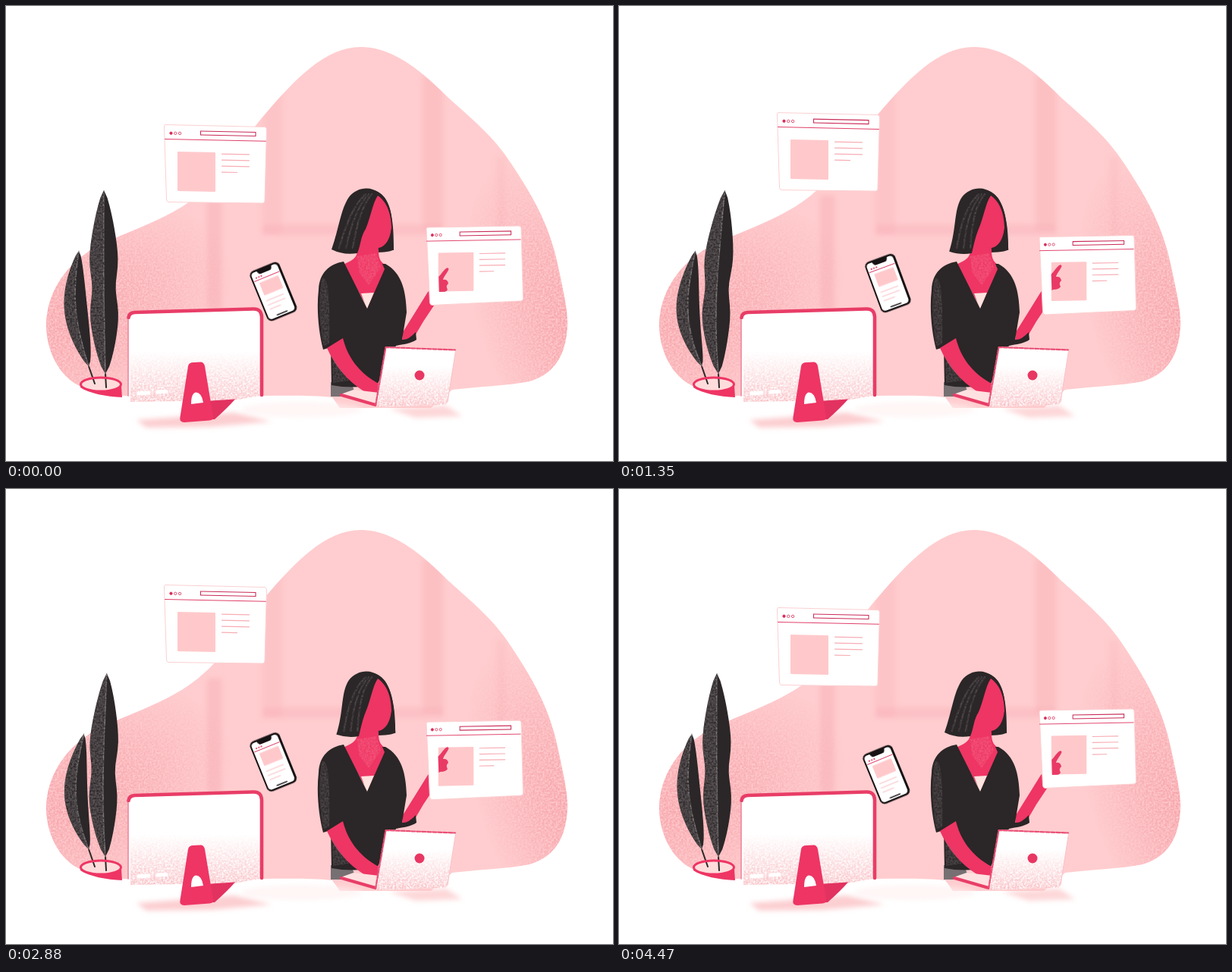
Animation, 800 px wide and 600 px high, one loop 4500 ms. Source, as an HTML page:

```html
<!DOCTYPE html>
<html lang="en">
<head>
<meta charset="utf-8">
<title>Working across screens</title>
<style>
  html, body { margin: 0; width: 100%; height: 100%; overflow: hidden; background: #fff; }
  svg { display: block; width: 100vw; height: 100vh; }
  .line { fill: none; stroke-linecap: round; stroke-linejoin: round; }
</style>
</head>
<body>
<svg viewBox="0 0 800 600">
  <defs>
    <filter id="grain" x="-5%" y="-5%" width="110%" height="110%" color-interpolation-filters="sRGB">
      <feTurbulence type="fractalNoise" baseFrequency=".4" numOctaves="3" seed="4"/>
      <feColorMatrix values="0 0 0 0 0  0 0 0 0 0  0 0 0 0 0  2 0 0 0 -.4" result="n"/>
      <feComposite in="SourceGraphic" in2="n" operator="in"/>
    </filter>
    <filter id="soft" x="-30%" y="-30%" width="160%" height="160%"><feGaussianBlur stdDeviation="3"/></filter>
    <radialGradient id="shade">
      <stop offset="0" stop-color="#f2939b" stop-opacity=".75"/>
      <stop offset=".5" stop-color="#f2939b" stop-opacity=".45"/>
      <stop offset="1" stop-color="#f2939b" stop-opacity="0"/>
    </radialGradient>
    <linearGradient id="fade" x1="0" y1="0" x2="0" y2="1">
      <stop offset="0" stop-color="#f7a3aa" stop-opacity="0"/>
      <stop offset="1" stop-color="#f7a3aa" stop-opacity=".7"/>
    </linearGradient>
    <clipPath id="blobClip"><use href="#blob"/></clipPath>
    <clipPath id="picClip"><path id="picHole" d="M569 325 616 324 617.500 376 571 377Z"/></clipPath>
  </defs>

  <path id="blob" fill="#ffcdcf" d="M468 54C510 54 548 86 583 121C613 148 643 172 666 208C695 252 717 290 728 345C735 378 740 400 740 418C739 455 727 484 690 495C660 501 620 502 588 506L560 530H440L430 516C400 513 370 514 340 514H152C130 512 112 506 97 501C70 488 53 455 53 420C54 376 80 340 118 318C160 297 212 282 250 252C292 220 310 178 342 142C380 98 420 54 468 54Z"/>

  <g clip-path="url(#blobClip)">
    <g filter="url(#soft)" fill="#f6a9b0">
      <rect x="265" y="250" width="19" height="150" opacity=".42"/>
      <rect x="338" y="105" width="26" height="196" opacity=".26"/>
      <rect x="338" y="288" width="238" height="14" opacity=".32"/>
      <rect x="549" y="92" width="27" height="204" opacity=".36"/>
      <rect x="646" y="200" width="13" height="110" opacity=".2"/>
    </g>
    <g filter="url(#grain)" fill="url(#shade)">
      <ellipse cx="95" cy="410" rx="215" ry="135" transform="rotate(-25 95 410)"/>
      <ellipse cx="745" cy="425" rx="115" ry="235" transform="rotate(-22 745 425)"/>
    </g>
  </g>

  <!-- desk shading -->
  <g filter="url(#soft)">
    <ellipse cx="390" cy="532" rx="80" ry="10" fill="#fff0f0" opacity=".6"/>
    <path d="M505 531 580 527 601 541 540 543Z" fill="#fdc6c8" opacity=".7"/>
    <path d="M172 546 300 536 350 548 270 555 185 556Z" fill="#fcc3c6" opacity=".8"/>
  </g>

  <!-- plant -->
  <ellipse cx="125" cy="499.500" rx="26" ry="8.500" fill="#ffdcdc"/>
  <g id="plant"></g>
  <path d="M98 501C106 511 140 511 152 501L153 516C132 515 110 511 98 503Z" fill="#ee3564"/>
  <ellipse cx="125" cy="499" rx="26.500" ry="9" fill="none" stroke="#ee3564" stroke-width="3"/>

  <!-- monitor -->
  <path d="M161 518V412Q161 404 169 403L326 398Q337 398 337 409V515L300 522 161 528Z" fill="#fff"/>
  <path d="M164 455H335V514L300 520 164 522Z" fill="url(#fade)" filter="url(#grain)"/>
  <path class="line" d="M161 514V414" stroke="#f08aa0" stroke-width="1.700"/>
  <path class="line" d="M161.500 411Q162 404.500 170 404L326 399.500Q336.500 399 337 410V513" stroke="#e83d67" stroke-width="4.600"/>
  <path class="line" d="M175 511 188 510M200 509 211 508.500" stroke="#fff" stroke-width="5"/>
  <path d="M262 521 302 518.500Q291 531 275 545L250 546Z" fill="#e23260"/>
  <path d="M240 475Q241 470 247 470L257 469.500Q261 470 262 475L273 541Q274 546 268 546.500L235 549Q228 549 229.500 542Z" fill="#ee3564"/>
  <path d="M244 525Q244 510 250.500 509.500Q258 510 260 523Z" fill="#fff"/>

  <g id="winL"></g>

  <!-- woman -->
  <path id="backHair" fill="#2b2627"/>
  <path d="M428 496 455 497 462 515 428 515Z" fill="#777073"/>
  <path d="M444 341C455 336 463 333 463 322L465 308H490L491 322C491 334 494 338 502 343L478 400Z" fill="#ee3564"/>
  <path d="M468 379 485 378 476 400Z" fill="#ffe3df"/>
  <path d="M523 430 538 406 556 377 572 366 566 392 550 416 536 440 522 442Z" fill="#ee3564"/>
  <path d="M445 337C426 340 413 352 412 374C409 400 412 430 418 453L428 450 429 500Q455 505 489 500L514 448C524 446 534 445 541 440L540 430Q530 441 522 440L528 404C527 376 522 352 500 340L496 340 499 347 476 399Z" fill="#2b2627"/>
  <path d="M423 451 444 438C450 462 464 483 491 498L489 515 473 509C450 494 434 476 423 451Z" fill="#ee3564"/>
  <g filter="url(#grain)" opacity=".4">
    <path d="M416 360Q428 350 426 446L418 448Q410 400 416 360ZM430 462 452 494 431 497Z" fill="#777073"/>
    <path d="M462 330 488 326 494 345 478 368 466 352Z" fill="#f87b91"/>
  </g>
  <path d="M489 249C502 258 510 276 508 293C506 307 501 317 491 319C477 320 467 313 466 300C466 272 476 254 489 249Z" fill="#ee3564"/>
  <path id="hair" fill="#2b2627"/>
  <path id="shine" class="line" stroke="#777073" stroke-width="2.500" opacity=".45" filter="url(#grain)"/>

  <g id="winR"></g>
  <g clip-path="url(#picClip)">
    <path id="hand" fill="#e93a65" d="M569 358C573 355 575 350 580 346Q583 344 583.500 347C582 352 577 356 576 361Q582 360 583 366Q579 369 582 374Q580 378 572 378L566 382Z"/>
  </g>

  <g id="phone">
    <rect x="-21" y="-35.500" width="42" height="71" rx="6.500" fill="#171214"/>
    <rect x="-19" y="-33" width="37" height="66" rx="4.500" fill="#fff"/>
    <path d="M-11-34H11L9-29.500Q8-28 6-28H-6Q-8-28-9-29.500Z" fill="#171214"/>
    <path class="line" d="M-18-21.500H17" stroke="#e0406a"/>
    <path class="line" d="M-14-25h.1M-10.500-25h.1M-7-25h.1" stroke="#d92a57" stroke-width="2"/>
    <rect x="-13" y="-17.500" width="27" height="18" rx="1" fill="#ffc9cb"/>
    <path class="line" d="M-13 8H11M-13 14H11M-13 20H2" stroke="#f9bcc1" stroke-width="1.200"/>
    <path class="line" d="M-7 30.500H7" stroke="#171214" stroke-width="1.500"/>
  </g>

  <!-- laptop -->
  <path d="M441 512 458 506 492 510 488 526Z" fill="#ffe1e1"/>
  <path class="line" d="M442 513 487 526" stroke="#e83e67" stroke-width="4"/>
  <path d="M501 449 593 453 582 522Q581 526 576 526L488 529Z" fill="#fff"/>
  <path d="M497 475 589 475 582 522Q581 526 576 526L488 529Z" fill="url(#fade)" filter="url(#grain)"/>
  <path class="line" d="M592.500 455 582 522" stroke="#f8bfc4"/>
  <path class="line" d="M487 527 500.500 450 592 453.500" stroke="#ea4f75" stroke-width="2.200" stroke-dasharray="5 2"/>
  <circle cx="545" cy="487" r="6.500" fill="#e83762"/>
</svg>
<script>
const $ = id => document.getElementById(id);
const LOOP = 4500, STEP = 30, { PI, sin, cos, min, abs, exp } = Math;

// One eased rise and fall, 1 at `peak`, lasting `half` ms each way.
const swell = (t, peak, half) => (1 + cos(PI * min(1, abs(t - peak) / half))) / 2;
const wave = (t, delay) => sin(2 * PI * (t - delay) / LOOP);
const fix = n => n.toFixed(2);
const set = (id, name, value) => $(id).setAttribute(name, value);
const move = (id, x, y, a = 0) =>
  set(id, 'transform', `translate(${fix(x)} ${fix(y)}) rotate(${fix(a)})`);

// Browser card: outline plus a shared layout, fitted by a transform.
function card(box, fit) {
  const dots = [0, 1, 2].map(i =>
    `<circle cx="${9 + i * 5.8}" cy="11" r="1.7" fill="${i ? '#fff' : '#d92a57'}" stroke="#d92a57" stroke-width=".8"/>`).join('');
  const rows = [0, 1, 2, 3].map(i => `M76 ${37 + i * 8}h${i < 3 ? 36 : 20}`).join('');
  return `<path d="${box}" fill="#fff" stroke="#fbd0d2" stroke-linejoin="round"/>
    <g transform="${fit}">${dots}
      <path class="line" d="M1 19H134" stroke="#e0406a"/>
      <rect x="48" y="7.500" width="72.500" height="5" fill="#fff" stroke="#c92c58" stroke-width="1.100"/>
      <rect x="17.500" y="35" width="50" height="52" rx="1" fill="#ffc9cb"/>
      <path class="line" d="${rows}" stroke="#f7adb4" stroke-width="1.200"/>
    </g>`;
}
$('winL').innerHTML = card(
  'M210 156.500 341 159.500Q343.500 160 343.500 163L341 257Q341 260 338 260L214 258.500Q211.500 258 211.500 255L208.500 159Q208.500 156.500 210 156.500Z',
  'translate(208.5 156.5) skewY(1.2)');
$('winR').innerHTML = card(
  'M556 292 676 290Q679 290 679 293L681.500 386Q681.500 389 678 389L562 394.500Q559 394.500 558.500 391L554 294Q554 292 556 292Z',
  'translate(553.5 291.5) skewY(-1) scale(.93 .98)');

const leaves = [
  { foot: [109, 475], tip: [96, 323], root: [117, 498], curl: 10.5, wide: 14.5, waist: 0,
    lean: t => 8 * swell(t, 2300, 2100) },
  { foot: [131, 485], tip: [129, 243], root: [132, 503], curl: 1, wide: 20, waist: 5.5,
    lean: t => 13.5 * swell(t, 1850, 1600) }
];
$('plant').innerHTML = leaves.map((_, i) => `
  <path id="stem${i}" class="line" stroke="#2b2627" stroke-width="2"/>
  <path id="leaf${i}" fill="#2b2627"/>
  <path id="gloss${i}" fill="#777073" opacity=".6" filter="url(#grain)"/>
  <path id="rib${i}" class="line" stroke="#a09a9c" stroke-width="1.5" opacity=".7" filter="url(#grain)"/>`).join('');

function drawLeaf(leaf, i, t) {
  const N = 24, { foot, tip, root } = leaf;
  const lean = leaf.lean(t), belly = -3.5 * swell(t, 1950, 2000);
  const edge = side => Array.from({ length: N + 1 }, (_, k) => {
    const h = k / N, bow = sin(PI * h);
    const half = leaf.wide * Math.max(0, bow) ** .7 * (1.15 - .2 * h)
      - leaf.waist * exp(-(((h - .47) / .11) ** 2));
    const x = foot[0] + (tip[0] - foot[0]) * h - leaf.curl * bow
      + lean * h ** 1.9 + belly * bow * (1 - h) * 1.7;
    return `${fix(x + side * half)} ${fix(foot[1] + (tip[1] - foot[1]) * h)}`;
  });
  const left = edge(-1), rib = edge(0), back = rib.slice().reverse();
  set('leaf' + i, 'd', `M${left.join('L')}L${edge(1).reverse().join('L')}Z`);
  set('gloss' + i, 'd', `M${left.join('L')}L${back.join('L')}Z`);
  set('rib' + i, 'd', `M${rib.join('L')}`);
  set('stem' + i, 'd', `M${rib[0]}L${root.join(' ')}`);
}

function drawHair(s) {
  const x = 429 + s, y = 321 + s * .45, r = 511 + s * s / 18;
  set('backHair', 'd', `M488 244C503 250 509 270 ${fix(r - 2)} 292Q${fix(r - 1)} 308 ${fix(r)} 321Q${fix(r - 4)} 325 484 325L482 285Z`);
  set('hair', 'd', `M491 246C480 237 462 239 452 252C441 268 ${fix(x + 10)} 293 ${fix(x)} ${fix(y)}Q${fix(x + 16)} 329 ${fix(463 + s * .3)} 326C468 314 ${fix(467 + s * .4)} 305 474 294C480 281 483 260 490 250C500 255 508 272 508 293L506 322 ${fix(r)} 322C${fix(r)} 298 511 257 491 246Z`);
  set('shine', 'd', [0, 1, 2].map(i =>
    `M${474 + i * 4} 248Q${453 + i * 6} 268 ${fix(x + 10 + i * 9)} 319`).join(''));
}

function draw(t) {
  const drop = 18.8 * swell(t, 2230, 2250);
  move('winL', 0, -36 * swell(t, 2370, 1900));
  move('winR', 0, drop);
  move('picHole', 0, drop);
  move('hand', 0, -6 * swell(t, 2250, 2250));
  move('phone', 353 + 1.5 * wave(t, 300), 376.5 - 19.5 * swell(t, 2330, 2130), 1.4 * wave(t, 400) - 21.6);
  leaves.forEach((leaf, i) => drawLeaf(leaf, i, t));
  drawHair(8.5 * swell(t, 2130, 2250));
}

function tick() {
  const t = performance.now() % LOOP;
  draw(Math.floor(t / STEP) * STEP);
  requestAnimationFrame(tick);
}
tick();
</script>
</body>
</html>
```
